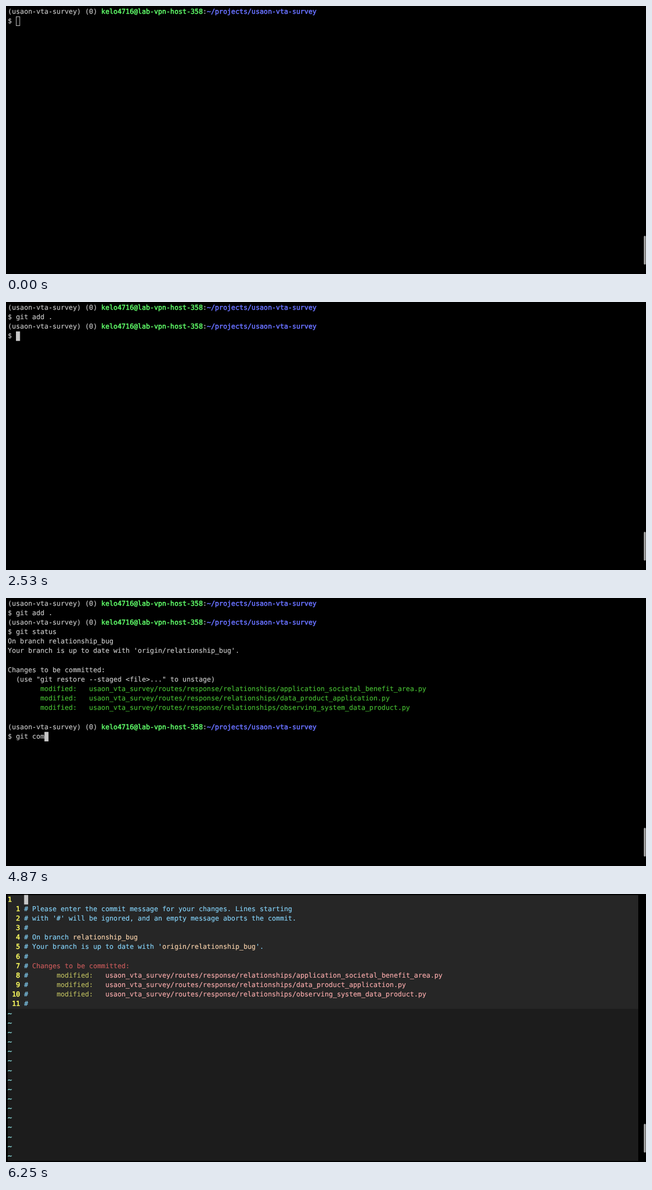
An HTML page with a canvas for the animation above (8480 ms loop, 1156 by 484 pixels).

```html
<!DOCTYPE html>
<html lang="en">
<head>
<meta charset="utf-8">
<title>Terminal session</title>
<style>
  html, body { margin: 0; width: 100%; height: 100%; overflow: hidden; background: #000; }
  canvas, pre { position: absolute; left: 0; top: 0; }
  pre {
    left: 3.3px; top: 1.7px; margin: 0; color: #cfcfcf;
    font: 12.2px/17.15px "DejaVu Sans Mono", monospace;
    text-rendering: geometricPrecision;
    font-variant-ligatures: none;
    -webkit-text-stroke: 0.12px;
  }
  b { font-weight: normal; -webkit-text-stroke: 0.55px; }
  .host { color: #5ffa68; }
  .path { color: #6871ff; }
  .staged { color: #48c034; }
  .ok { background: #43b82f; }
  .num { color: #ffff5f; }
  .note { color: #87d7ff; }
  .branch { color: #ffd7af; }
  .head { color: #cd5c5c; }
  .kind { color: #bdbd5f; }
  .file { color: #ffafaf; }
  .tilde { color: #87d7d7; }
</style>
</head>
<body>
<canvas id="stage" width="1156" height="484"></canvas>
<pre id="screen"></pre>
<script>
const LOOP = 8480, LEFT = 3.3, TOP = 1.7, CELL_W = 7.345, CELL_H = 17.15;
const GREY = '#c7c7c7';
const screen = document.getElementById('screen');
const ctx = document.getElementById('stage').getContext('2d');

const tag = (name, text, el = 'span') => `<${el} class="${name}">${text}</${el}>`;

// n evenly spaced key presses from a to b
const keys = (a, b, n) => Array.from({ length: n }, (_, i) => a + (b - a) * i / (n - 1));

const prompt = '(usaon-vta-survey) (0) ' + tag('host', 'kelo4716@lab-vpn-host-358', 'b') +
  ':' + tag('path', '~/projects/usaon-vta-survey', 'b') + '\n$ ';

const files = ['application_societal_benefit_area', 'data_product_application', 'observing_system_data_product']
  .map(name => `usaon_vta_survey/routes/response/relationships/${name}.py`);

const statusOutput = [
  'On branch relationship_bug',
  "Your branch is up to date with 'origin/relationship_bug'.",
  '',
  'Changes to be committed:',
  '  (use "git restore --staged &lt;file&gt;..." to unstage)',
  ...files.map(file => ' '.repeat(8) + tag('staged', 'modified:   ' + file)),
  '', ''
].join('\n');

const hooks = ['check for added large files', 'check vcs permalinks', 'fix end of files', 'black']
  .map(name => name.padEnd(73, '.') + tag('ok', 'Passed') + '\n');

const commands = [
  { text: 'git add .', enter: 2530, done: 2530, output: () => '',
    typed: [...keys(1490, 1890, 6), ...keys(2050, 2130, 2), 2290] },
  { text: 'git status', enter: 3900, done: 3980, output: t => t < 3980 ? '' : statusOutput,
    typed: [...keys(2780, 2850, 2), ...keys(3010, 3090, 2), 3250, 3250, ...keys(3410, 3570, 3), 3730] },
  { text: 'git commit', enter: 5350, done: Infinity,
    output: t => hooks.slice(0, t < 5680 ? 0 : t < 5760 ? 2 : t < 5840 ? 3 : 4).join(''),
    typed: [...keys(4310, 4550, 4), ...keys(4710, 4870, 3), ...keys(5040, 5120, 2), 5280] }
];

function shellText(t) {
  let text = prompt;
  for (const cmd of commands) {
    text += cmd.text.slice(0, cmd.typed.filter(key => key <= t).length);
    if (t < cmd.enter) break;
    text += '\n' + cmd.output(t);
    if (t < cmd.done) break;
    text += prompt;
  }
  return text;
}

const note = text => tag('note', text);
const messageLines = [
  note('# Please enter the commit message for your changes. Lines starting'),
  note("# with '#' will be ignored, and an empty message aborts the commit."),
  note('#'),
  note('# On branch ') + tag('branch', 'relationship_bug'),
  note("# Your branch is up to date with '") + tag('branch', 'origin/relationship_bug') + note("'."),
  note('#'),
  note('# ') + tag('head', 'Changes to be committed:'),
  ...files.map(file => note('#') + ' '.repeat(7) + tag('kind', 'modified:') + '   ' + tag('file', file)),
  note('#')
];
const editorText = [
  tag('num', '1', 'b'),
  ...messageLines.map((line, i) => tag('num', String(i + 1).padStart(3), 'b') + ' ' + line),
  ...Array(16).fill(tag('tilde', '~', 'b'))
].join('\n');

function rect(color, x, y, w, h) {
  ctx.fillStyle = color;
  ctx.fillRect(x, y, w, h);
}

function drawCursor(row, col, filled) {
  const x = LEFT + col * CELL_W, y = TOP + row * CELL_H;
  rect(GREY, x, y, CELL_W, CELL_H);
  if (!filled) rect('#000', x + 1, y + 1, CELL_W - 2, CELL_H - 2);
}

function drawPointer(x, y) {
  ctx.beginPath();
  for (const s of [-1, 1]) {
    ctx.moveTo(x - 3, y + 6.5 * s);
    ctx.quadraticCurveTo(x, y + 6.5 * s, x, y + 4 * s);
    ctx.quadraticCurveTo(x, y + 6.5 * s, x + 3, y + 6.5 * s);
  }
  ctx.moveTo(x, y - 5);
  ctx.lineTo(x, y + 5);
  ctx.moveTo(x - 2, y + 2.5);
  ctx.lineTo(x + 2, y + 2.5);
  for (const [color, width] of [['#e8e8e8', 2.8], ['#000', 1]]) {
    ctx.strokeStyle = color;
    ctx.lineWidth = width;
    ctx.stroke();
  }
}

function pointerAt(t) {
  if (t >= 350 && t < 430) return [726, 473.5];
  if (t < 760 || t >= 1490) return null;
  return t < 830 ? [449, 477] : t < 910 ? [441, 475] : [436.5, 473.5];
}

let shown = null;
function setText(html) {
  if (html !== shown) screen.innerHTML = shown = html;
}

function draw(t) {
  rect('#000', 0, 0, 1156, 484);
  if (t >= 6250) {
    rect('#1c1c1c', 3, 2, 1139, 480);
    rect('#262626', 3, 2, 1139, 205.5);
    setText(editorText);
    drawCursor(0, 4, true);
  } else if (t >= 6160) {
    setText('');
  } else {
    setText(shellText(t));
    const lines = screen.textContent.split('\n');
    drawCursor(lines.length - 1, lines.at(-1).length, t >= 830);
  }
  const pointer = pointerAt(t);
  if (pointer) drawPointer(...pointer);
  ctx.fillStyle = '#a0a0a0';
  ctx.beginPath();
  ctx.roundRect(1152, 415, 3.6, 52, 1.8);
  ctx.fill();
}

const start = performance.now();
function tick() {
  draw((performance.now() - start) % LOOP);
  requestAnimationFrame(tick);
}
tick();
</script>
</body>
</html>
```
